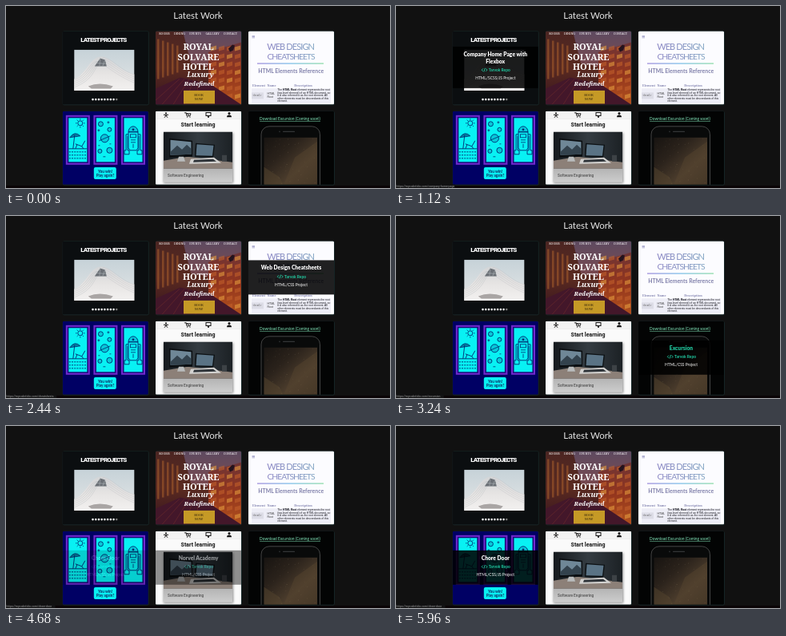
These frames come from a looping animation (480x228 px, 6 s). An HTML page:

```html
<!DOCTYPE html>
<html lang="en">
<head>
<meta charset="utf-8">
<title>Latest Work</title>
<style>
html, body { margin: 0; width: 100%; height: 100%; overflow: hidden; background: #111; }
svg { display: block; width: 100vw; height: 100vh; }
text { font-family: Lato, sans-serif; }
.serif { font-family: "Noto Serif", serif; }
.sans { font-family: "Liberation Sans", sans-serif; }
.roboto { font-family: Roboto, sans-serif; }
.mono { font-family: "Liberation Mono", monospace; }
</style>
</head>
<body>
<svg id="stage" viewBox="0 0 480 228" xmlns="http://www.w3.org/2000/svg"></svg>
<script>
const CARD_W = 107, CARD_H = 92, LOOP = 6000, FADE = 160, STATUS_START = 720;
const TEAL = '#20c9a0';

const rect = (x, y, w, h, fill, extra = '') =>
  `<rect x="${x}" y="${y}" width="${w}" height="${h}" fill="${fill}" ${extra}/>`;
const circle = (x, y, r, fill, extra = '') =>
  `<circle cx="${x}" cy="${y}" r="${r}" fill="${fill}" ${extra}/>`;
const path = (d, fill, extra = '') => `<path d="${d}" fill="${fill}" ${extra}/>`;
const line = (d, color, width = .6, extra = '') =>
  path(d, 'none', `stroke="${color}" stroke-width="${width}" ${extra}`);
const label = (s, x, y, size, fill, extra = '') =>
  `<text x="${x}" y="${y}" font-size="${size}" fill="${fill}" ${extra}>${s}</text>`;
const centered = (s, x, y, size, fill, extra = '') =>
  label(s, x, y, size, fill, `text-anchor="middle" ${extra}`);
const gradient = (id, dir, ...colors) =>
  `<linearGradient id="${id}" ${dir}>${colors.map((c, i) =>
    `<stop offset="${i / (colors.length - 1)}" stop-color="${c}"/>`).join('')}</linearGradient>`;
const repeat = (n, draw) => Array.from({ length: n }, (_, i) => draw(i)).join('');

function randomFrom(seed) {
  return () => (seed = (seed * 16807) % 2147483647) / 2147483647;
}

const DOWN = 'x2="0" y2="1"';
const defs = gradient('air', DOWN, '#c6d2d8', '#d5dcdf', '#e2e3e3')
  + gradient('roof', DOWN, '#d3d5d7', '#e6e4e3', '#f3f1f0')
  + gradient('lobby', DOWN, '#4b2522', '#5a2a20', '#35141f')
  + gradient('dusk', DOWN, '#5d4a60', '#7a4a50')
  + gradient('facade', DOWN, '#6e3436', '#93351d', '#b0501d')
  + gradient('heading', '', '#8b86c4', '#8592c2', '#7fa3c2')
  + gradient('rule', '', '#a08fdc', '#7fc0ea', '#8fdca8')
  + gradient('sky', 'x2="1" y2="1"', '#181411', '#2a221b', '#4c3d2d', '#382d22')
  + gradient('desk', 'x2="1"', '#15191d', '#343c42', '#1c2125')
  + gradient('caption', DOWN, '#b4b4b4', '#cdcdcd')
  + '<filter id="soft" x="-20%" y="-20%" width="140%" height="140%"><feGaussianBlur stdDeviation="1.8"/></filter>';

// Everything inside a card uses coordinates relative to its top left corner.
function projectsCard() {
  const photo = rect(14.5, 23.5, 75, 51, 'url(#air)')
    + path('M14.5 60C28 56 33 35 46 32C60 30 68 50 89.5 54V74.5H14.5Z', 'url(#roof)')
    + repeat(5, i => line(`M14.5 ${61 + i * 2.4}C${30 + i * 2} ${57 + i} ${34 + i} ${38 + i * 3} ${43 + i} 38`, '#b9bdc1', .4))
    + repeat(5, i => line(`M50 ${33 + i * 2}C62 ${34 + i * 4} 72 ${49 + i * 2} 89.5 ${55 + i * 2.5}`, '#bfc1c4', .4))
    + path('M40 44L47 34 53 36 55 44Z', '#6b7076')
    + line('M47 34L46 44 M53 36L50 44 M42 40L54 41', '#b9bec2', .5)
    + path('M32 69Q46 63 63 69L60 72H36Z', '#a9a5a4');
  return rect(0, 0, CARD_W, CARD_H, '#0b0e10')
    + centered('LATEST PROJECTS', 51, 13.8, 8, '#fff', 'class="roboto" font-weight="900" letter-spacing="-.9"')
    + photo
    + repeat(9, i => circle(37.7 + i * 3.72, 85.7, 1.3, i < 8 ? '#f4f4f4' : '#777'));
}

function hotelCard() {
  const windows = repeat(28, i => {
    const x = 69 + (i % 4) * 10, y = 20 + Math.floor(i / 4) * 10;
    return path(`M${x} ${y}l7-2v5l-7 2z`, i % 3 ? '#c2602a' : '#e39a3c', 'opacity=".6"');
  });
  const title = ['ROYAL', 'SOLVARE', 'HOTEL'].map((s, i) =>
    centered(s, 53.5, 23.8 + i * 12.5, 11, '#fff', 'class="serif" font-weight="900"')).join('');
  const nav = ['ROOMS', 'DINING', 'EVENTS', 'GALLERY', 'CONTACT'].map((s, i) =>
    centered(s, [11, 30, 49.5, 71, 93.5][i], 4.6, 3.8, '#fff', 'class="serif"')).join('');
  return rect(0, 0, CARD_W, CARD_H, 'url(#lobby)')
    + path('M34 0H107V24L66 44 44 40Z', 'url(#dusk)')
    + path('M107 14L66 26V80L107 92Z', 'url(#facade)') + windows
    + repeat(5, i => path(`M${2 + i * 6} ${10 + i * 2}h2.5v${50 - i * 4}h-2.5z`, '#a9602d', 'opacity=".55"'))
    + path('M0 72L31 58 68 66 107 92H0Z', '#43172a')
    + repeat(5, i => line(`M${i * 14 - 6} 92L${30 + i * 6} 60`, '#96402e', .6, 'opacity=".5"'))
    + path('M91 22l5-5 3 1-2 6-4 2z', '#24131d')
    + nav + title
    + centered('Luxury', 56, 57.5, 9, '#fff', 'class="serif" font-style="italic" font-weight="700"')
    + centered('Redefined', 54.5, 69, 7.6, '#fff', 'class="serif" font-style="italic" font-weight="700"')
    + rect(35, 74.5, 39, 16.5, '#c69a26')
    + centered('BOOK', 54, 81.6, 4.1, '#33250f', 'class="serif"')
    + centered('NOW', 54, 86.4, 4.1, '#33250f', 'class="serif"');
}

function cheatsheetCard() {
  const description = [
    'The <tspan font-weight="700">HTML Root</tspan> element represents the root',
    '(top-level element) of an HTML document, so',
    'it is also referred to as the root element. All',
    'other elements must be descendants of this',
    'element.'
  ];
  const head = (s, x) => centered(s, x, 69.6, 3.8, '#8283b0', 'class="serif" font-weight="700"');
  return rect(0, 0, CARD_W, CARD_H, '#fcfcff')
    + repeat(3, i => rect(4.5, 5.6 + i * 1.3, 3.5, .6, '#8585b8'))
    + centered('WEB DESIGN', 52.6, 23.8, 11, 'url(#heading)', 'letter-spacing="-.9"')
    + centered('CHEATSHEETS', 53, 35.3, 10.4, 'url(#heading)', 'letter-spacing="-1.05"')
    + rect(11, 40, 83, 1.3, 'url(#rule)')
    + centered('HTML Elements Reference', 53.2, 53, 6.9, '#8080ab', 'font-weight="700"')
    + head('Element', 13) + head('Name', 29) + head('Description', 68.5)
    + rect(4, 72, 99, 19, '#ededf6') + rect(4, 77, 15, 8, '#dcdce6')
    + label('&lt;html&gt;', 5.5, 82, 3, '#555', 'class="mono"')
    + label('HTML', 23.5, 79.6, 3.5, '#333', 'class="sans"')
    + label('Root', 23.5, 83.4, 3.5, '#333', 'class="sans"')
    + description.map((s, i) => label(s, 36.3, 74.5 + i * 3.65, 3.3, '#16161c', 'class="sans"')).join('');
}

function doorsCard() {
  const ink = '#002a72';
  const beach = circle(18, 10, 3, '#08f1f3', `stroke="${ink}" stroke-width=".9"`)
    + repeat(8, i => `<g transform="rotate(${i * 45} 18 10)">${line('M18 5.8V4.2', ink, .8)}</g>`)
    + path('M5 28Q11 19 18 26Z', '#067fa0', `stroke="${ink}" stroke-width=".8"`)
    + line('M11 25L9 42 M12 36L20 39 24 32 M14 37L12 42 M20 39L22 42 M3.5 42H26.5', ink, .9)
    + repeat(3, i => line(`M4 ${46 + i * 4}H26`, ink, .9, 'stroke-dasharray="2 1.2"'));
  const planets = [[9, 11, 3], [20, 18, 2.5], [14, 29, 5], [8, 45, 2.5], [20, 44, 3.5]]
    .map(([x, y, r]) => circle(x, y, r, '#08c8d8', `stroke="${ink}" stroke-width=".9"`)).join('')
    + line('M7 32L21 26 M5 19h3 M6.5 17.5v3 M17 9h3 M18.5 7.5v3 M20 36h2 M6 38h2 M12 52h3', ink, .8);
  const robot = path('M9 21a6 7 0 0 1 12 0z', '#08c8d8', `stroke="${ink}" stroke-width=".9"`)
    + line('M9 21h12v20l-2 3h-8l-2-3z M6 24h3 M21 24h3 M6 24v20h-2v5h6v-5h-2v-18 M24 24v20h2v5h-6v-5h2v-18', ink, .9)
    + circle(15, 18, 1.4, ink) + rect(11.5, 24, 7, 4, 'none', `stroke="${ink}" stroke-width=".8"`)
    + line('M12 31h6 M12 34h6 M15 36v5', ink, .8);
  return rect(0, 0, CARD_W, CARD_H, '#000064')
    + [beach, planets, robot].map((art, i) => `<g transform="translate(${4 + i * 34.6} 5)">`
      + rect(0, 0, 30, 62, '#7129ce')
      + rect(2, 2, 26, 58, '#1a0a78') + rect(3.5, 3.5, 23, 55, '#08f1f3') + art + '</g>').join('')
    + rect(39, 70.3, 28, 15, '#08f1f3', 'rx="2"')
    + centered('You win!', 53.2, 77.2, 4.8, '#102460', 'font-weight="700"')
    + centered('Play again?', 53.2, 82.6, 4.6, '#102460', 'font-weight="700"');
}

function academyCard() {
  const icons = circle(13, 2.4, 1, '#111') + line('M10 4.5H16 M13 4V6 M13 5.5L11 8 M13 5.5L15 8', '#111', 1)
    + line('M36 2h2l1 4h4l1-3h-5 M38 2l4 3', '#111', .9) + circle(39.5, 7.3, .7, '#111') + circle(43, 7.3, .7, '#111')
    + rect(63, 1.7, 6, 4, 'none', 'stroke="#111"') + rect(65, 6, 2, 2, '#111')
    + circle(92, 2.7, 1.5, '#111') + path('M89 7.5Q89 4.8 92 4.8T95 7.5Z', '#111');
  const desk = rect(10, 26, 86, 46, 'url(#desk)')
    + path('M10 62L40 57 96 64V72H10Z', '#8c8078')
    + path('M17 34L46 37V57L17 58Z', '#0b0e11') + path('M18.5 36L44.5 38.5V54L18.5 55Z', '#6f8797')
    + path('M18.5 51L27 43 33 48 39 42 44.5 47V54L18.5 55Z', '#33424d')
    + path('M29 57h6l2 6H27z', '#b9bcbd')
    + path('M50 40L74 42 72 58 49 57Z', '#0c1013') + path('M51.5 41.5L72.5 43 71 56 50.5 55.5Z', '#5a7385')
    + path('M44 60L73 58 82 65 42 66Z', '#d3d2d0')
    + path('M48 61L72 60 76 63 47 64Z', '#30353a')
    + rect(83, 55, 6, 8, '#3d4246');
  return rect(0, 0, CARD_W, CARD_H, '#fafafa') + rect(0, 0, CARD_W, 9.5, '#f3f3f3')
    + rect(0, 9.5, CARD_W, .5, '#dedede') + icons
    + centered('Start learning', 53, 18.9, 6.9, '#2c2c2c', 'class="roboto" font-weight="900"')
    + rect(10, 27, 87, 63, '#000', 'opacity=".45" filter="url(#soft)"') + desk
    + rect(10, 72, 86, 17, 'url(#caption)')
    + label('Software Engineering', 15, 81.8, 4.7, '#606060', 'class="roboto" font-weight="700"');
}

function phoneCard() {
  const random = randomFrom(81);
  const stars = repeat(65, () => circle(20 + random() * 66, 34 + random() * 57,
    .12 + random() * .2, '#c5b092', `opacity="${.2 + random() * .4}"`));
  return rect(0, 0, CARD_W, CARD_H, '#030404')
    + centered('Download Excursion (Coming soon!)', 52, 11.2, 4.8, '#86edbf', 'text-decoration="underline"')
    + rect(16, 19, 73.5, 85, '#090a0a', 'rx="10" stroke="#555" stroke-width=".8"')
    + rect(43, 25, 15, 1.2, '#333537', 'rx=".6"') + circle(39, 25.6, .8, '#303234')
    + rect(19.5, 33, 66.5, 59, 'url(#sky)')
    + path('M44 92L58 58 86 38V92Z', '#57462f', 'opacity=".45"')
    + path('M19.5 92V70L38 82 44 92Z', '#55452f', 'opacity=".5"') + stars;
}

function overlayFor({ title, tech, accent }) {
  const twoLines = title.length > 1;
  const height = twoLines ? 52 : 43, middle = 45.5, center = 53.5;
  const first = twoLines ? 31.5 : 35.8;
  const repoY = twoLines ? 50.4 : 46.2;
  return rect(0, middle - height / 2, CARD_W, height, '#000', 'opacity=".87"')
    + title.map((s, i) => centered(s, center, first + i * 9.6, 6.7, accent ? TEAL : '#fff', 'font-weight="900"')).join('')
    + line(`M38 ${repoY - 3.4}l-1.7 1.7 1.7 1.7 M41.5 ${repoY - 3.4}l1.7 1.7-1.7 1.7 M40.5 ${repoY - 4}l-1.4 4.6`, TEAL, .9)
    + label('Tarvok Repo', 45, repoY, 4.9, TEAL, 'font-weight="700"')
    + centered(tech + ' Project', center, repoY + 10.2, 4.9, '#fff');
}

// Listed in the order in which the pointer visits them.
const TOP = 31.4, BOTTOM = 131.8;
const cards = [
  { x: 70.8, y: TOP, draw: projectsCard, title: ['Company Home Page with', 'Flexbox'], tech: 'HTML/SCSS/JS', slug: 'company-home-page', start: 360 },
  { x: 187, y: TOP, draw: hotelCard, title: ['Web Design System'], tech: 'HTML/CSS/JS', slug: 'web-design-system', start: 1200 },
  { x: 303, y: TOP, draw: cheatsheetCard, title: ['Web Design Cheatsheets'], tech: 'HTML/CSS', slug: 'cheatsheets', start: 2060 },
  { x: 303, y: BOTTOM, draw: phoneCard, title: ['Excursion'], tech: 'HTML/CSS', slug: 'excursion', start: 2860, accent: true },
  { x: 187, y: BOTTOM, draw: academyCard, title: ['Norvel Academy'], tech: 'HTML/CSS', slug: 'colmar-academy', start: 3880 },
  { x: 70.8, y: BOTTOM, draw: doorsCard, title: ['Chore Door'], tech: 'HTML/CSS/JS', slug: 'chore-door', start: 4640 }
];
const GAP = 40;
cards.forEach((card, i) => {
  card.end = i + 1 < cards.length ? cards[i + 1].start - GAP : LOOP;
});

document.getElementById('stage').innerHTML =
  `<defs>${defs}<clipPath id="card">${rect(0, 0, CARD_W, CARD_H, '#fff', 'rx="1.5"')}</clipPath></defs>`
  + rect(0, 0, 480, 228, '#111') + rect(0, 225, 480, 3, '#0a0406')
  + centered('Latest Work', 240, 15.9, 11.5, '#e6e6e6')
  + cards.map(card => `<g transform="translate(${card.x} ${card.y})">`
    + rect(.4, .4, CARD_W, CARD_H, 'none', 'rx="1.5" stroke="#1a3032" stroke-width=".8"')
    + `<g clip-path="url(#card)">${card.draw()}<g class="overlay">${overlayFor(card)}</g></g></g>`).join('')
  + `<g id="status">${rect(0, 223.8, 76, 4.2, '#131314', 'id="statusBox"')}`
  + label('', .5, 227.2, 3.5, '#9a9a9a', 'id="statusText" class="roboto"') + '</g>';

const overlays = document.querySelectorAll('.overlay');
const status = document.getElementById('status');
const statusBox = document.getElementById('statusBox');
const statusText = document.getElementById('statusText');

const ease = p => {
  const t = Math.max(0, Math.min(1, p));
  return t * t * (3 - 2 * t);
};

function render(time) {
  cards.forEach(({ start, end }, i) => {
    const opacity = ease((time - start) / FADE) * (1 - ease((time - end) / FADE));
    overlays[i].setAttribute('opacity', opacity);
  });
  const current = cards.filter(card => time >= card.start).pop() || cards[0];
  const url = 'https://mycodefolio.com/' + current.slug;
  status.setAttribute('visibility', time >= STATUS_START ? 'visible' : 'hidden');
  if (statusText.textContent !== url) {
    statusText.textContent = url;
    statusBox.setAttribute('width', url.length * 1.75 + 2);
  }
}

const began = performance.now();
function tick() {
  render((performance.now() - began) % LOOP);
  requestAnimationFrame(tick);
}
tick();
</script>
</body>
</html>
```
